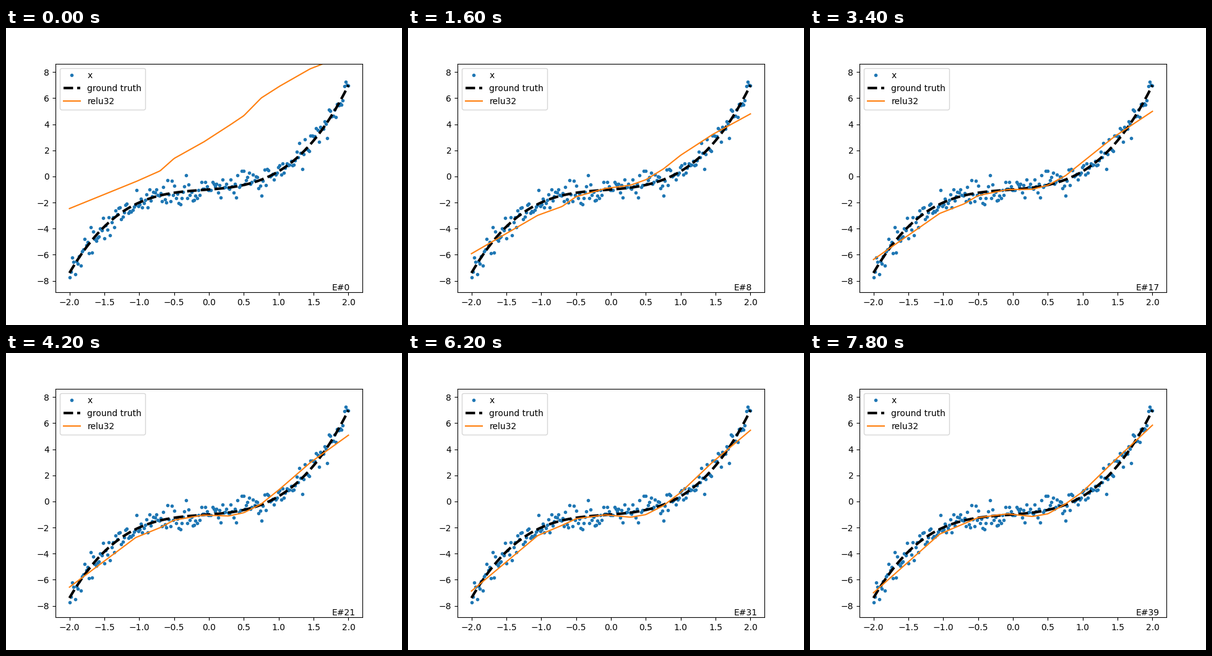
These frames come from a looping animation (640x480 px, 8 s). A matplotlib script:

```python
import numpy as np
import matplotlib.pyplot as plt
from matplotlib.animation import FuncAnimation

EPOCHS = 40
STEP_MS = 200
N = 200
NOISE = 0.5

# The network's piecewise linear fit: its bends and their heights at key epochs
BENDS = [-2, -1.05, -0.7, -0.5, -0.08, 0.28, 0.5, 0.75, 1, 1.45, 2]
KEYS = [0, 8, 25, 39]
FITS = np.array([
    [-2.46, -0.4, 0.43, 1.38, 2.63, 3.87, 4.66, 6.02, 6.88, 8.25, 9.4],
    [-5.92, -2.98, -2.3, -1.55, -0.92, -0.67, -0.25, 0.57, 1.63, 3.2, 4.8],
    [-6.77, -2.7, -1.92, -1.39, -1.08, -1.25, -1.05, -0.42, 0.65, 2.9, 5.17],
    [-7, -2.5, -1.7, -1.24, -0.95, -1.15, -0.95, -0.2, 0.75, 3.1, 5.85],
])


def truth(x):
    return 0.8 * x**3 + 0.2 * x**2 + 0.4 * x - 1


def settle(t, rate=5):
    return (1 - np.exp(-rate * t)) / (1 - np.exp(-rate))


def fit(epoch, x):
    # The first stretch learns fast and settles; later ones drift evenly
    first = KEYS[1]
    if epoch < first:
        epoch = first * settle(epoch / first)
    heights = [np.interp(epoch, KEYS, column) for column in FITS.T]
    return np.interp(x, BENDS, heights)


rng = np.random.default_rng(4)
x = np.linspace(-2, 2, N)
samples = truth(x) + NOISE * rng.standard_normal(N).clip(-2.5, 2.5)

fig, ax = plt.subplots(figsize=(6.4, 4.8), dpi=100)
ax.plot(x, samples, ".", color="C0", label="x")
ax.plot(x, truth(x), "k--", lw=3, label="ground truth")
line, = ax.plot(x, fit(0, x), color="C1", label="relu32")
counter = ax.text(0.9, 0.01, "E#0", transform=ax.transAxes)
ax.set_xlim(-2.2, 2.2)
ax.set_ylim(-8.883, 8.651)
ax.legend(loc="upper left")


def update(epoch):
    line.set_ydata(fit(epoch, x))
    counter.set_text(f"E#{epoch}")
    return line, counter


anim = FuncAnimation(fig, update, frames=EPOCHS, interval=STEP_MS,
                     repeat=True, repeat_delay=0)
plt.show()
```
